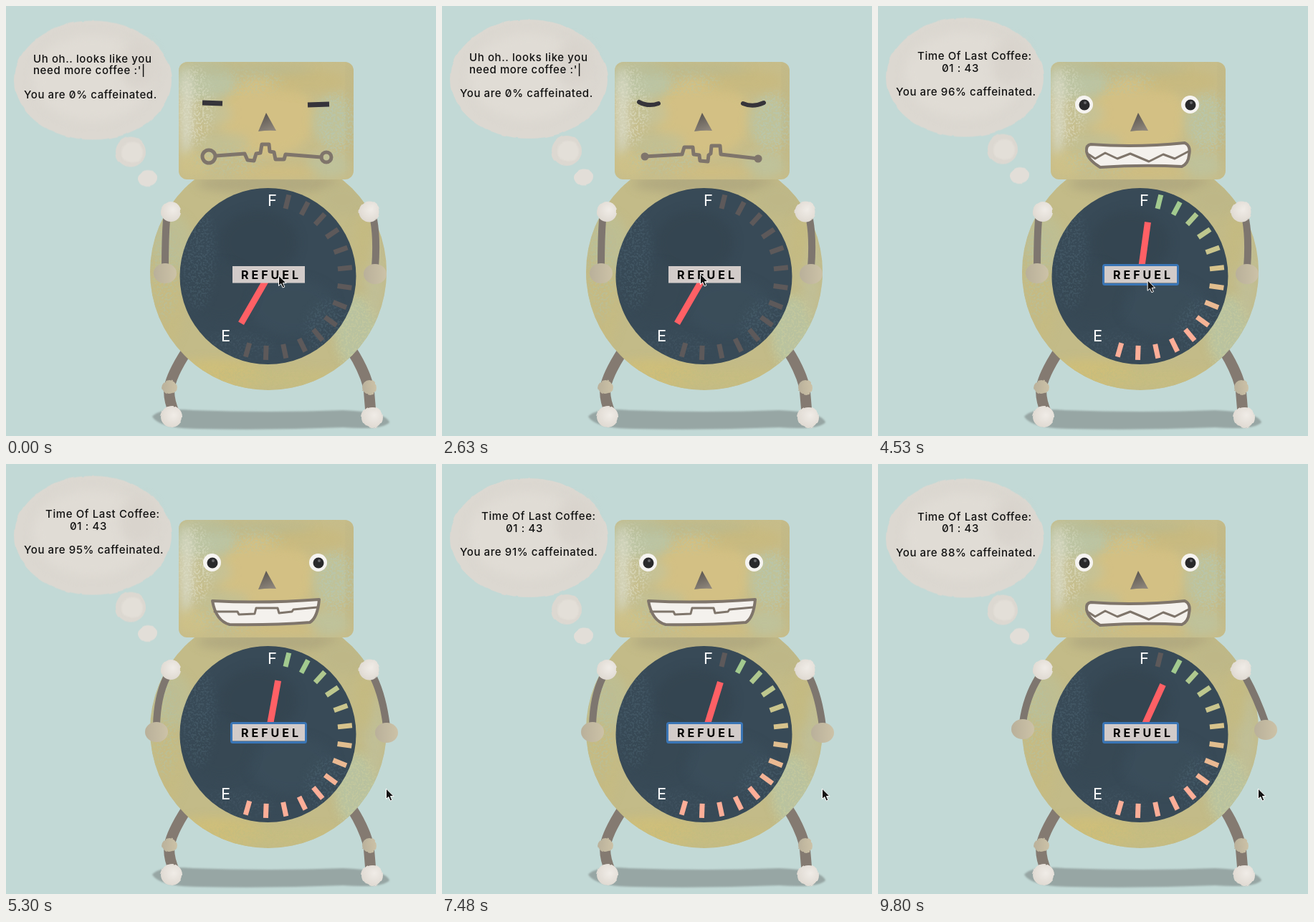
Write an HTML page that moves like this. It is 600 px wide and 600 px high and loops after 9.9 s.

```html
<!DOCTYPE html>
<html lang="en">
<head>
<meta charset="utf-8">
<title>Coffee robot</title>
<style>
  html, body { margin: 0; width: 100%; height: 100%; overflow: hidden; background: #c2d9d6; }
  svg { display: block; width: 100vw; height: 100vh; }
  filter { color-interpolation-filters: sRGB; }
  text { font: 500 15px Inter, Roboto, sans-serif; font-feature-settings: "zero"; white-space: pre; }
  #bubble text { letter-spacing: .6px; fill: #111; }
  .letter { font-size: 22px; font-weight: 400; fill: #fff; }
  .line { fill: none; stroke: #7f756b; stroke-width: 5; stroke-linejoin: round; stroke-linecap: round; }
  .lid { stroke: #36343a; stroke-width: 6; }
  .teeth { fill: #f4f1ed; stroke-width: 4; }
  .limb { fill: none; stroke: #7e766f; stroke-width: 10; stroke-linecap: round; }
</style>
</head>
<body>
<svg viewBox="0 0 600 600">
  <defs>
    <filter id="soft" x="-50%" y="-50%" width="200%" height="200%"><feGaussianBlur stdDeviation="7"/></filter>
    <filter id="edge" x="-10%" y="-30%" width="120%" height="160%"><feGaussianBlur stdDeviation="1.3"/></filter>
    <filter id="rough" x="-10%" y="-10%" width="120%" height="120%">
      <feTurbulence type="fractalNoise" baseFrequency=".05" numOctaves="2" seed="4"/>
      <feDisplacementMap in="SourceGraphic" scale="4" xChannelSelector="R" yChannelSelector="G"/>
    </filter>
    <filter id="grain" x="-20%" y="-20%" width="140%" height="140%">
      <feTurbulence type="fractalNoise" baseFrequency=".35" numOctaves="2" seed="8"/>
      <feColorMatrix values="0 0 0 0 1  0 0 0 0 1  0 0 0 0 1  9 0 0 0 -4.4" result="dots"/>
      <feGaussianBlur in="SourceGraphic" stdDeviation="6"/>
      <feComposite in2="dots" operator="in"/>
    </filter>
    <clipPath id="headShape"><rect x="241" y="78" width="244" height="164" rx="12"/></clipPath>
    <clipPath id="bodyShape"><circle cx="366" cy="371" r="165"/></clipPath>
    <clipPath id="dialShape"><circle cx="365.5" cy="377" r="123"/></clipPath>
    <radialGradient id="ball" cx=".6" cy=".4" r=".7">
      <stop offset="0" stop-color="#f0ece7"/><stop offset="1" stop-color="#ddd7cf"/>
    </radialGradient>
    <linearGradient id="hand">
      <stop offset="0" stop-color="#b9b09a"/><stop offset="1" stop-color="#ccc2a7"/>
    </linearGradient>
    <linearGradient id="nose" x1=".3" y1="0" x2=".7" y2="1">
      <stop offset="0" stop-color="#59544f"/><stop offset="1" stop-color="#8f877c"/>
    </linearGradient>
  </defs>

  <rect width="600" height="600" fill="#c2d9d6"/>
  <path d="M204 573Q215 560 260 564Q370 568 470 564Q530 566 535 581Q525 592 470 588Q370 592 270 590Q215 590 204 573Z" fill="#97a6a4" filter="url(#edge)"/>

  <g fill="none" stroke="#847a71" stroke-width="15">
    <path d="M253 480Q232 512 228 532Q226 548 235 568"/>
    <path d="M482 480Q499 506 506 532L509 568"/>
  </g>
  <g filter="url(#rough)">
    <circle cx="228" cy="532" r="10" fill="url(#hand)"/><circle cx="507" cy="532" r="10" fill="url(#hand)"/>
    <circle cx="231" cy="573" r="15" fill="url(#ball)"/><circle cx="511" cy="574" r="15" fill="url(#ball)"/>
  </g>

  <g id="body" clip-path="url(#bodyShape)"><rect x="200" y="200" width="334" height="340" fill="#c3bb88"/></g>
  <g id="head" clip-path="url(#headShape)"><rect x="241" y="78" width="244" height="164" fill="#c7bd8a"/></g>
  <g id="dial" clip-path="url(#dialShape)"><rect x="240" y="250" width="250" height="252" fill="#384a57"/></g>

  <text class="letter" x="365" y="279">F</text>
  <text class="letter" x="300" y="468">E</text>
  <g id="ticks"></g>
  <rect id="needle" x="361.5" y="301" width="9" height="76" fill="#ff6065"/>
  <rect id="button" x="316" y="363" width="101" height="23.5" fill="#d2cbc9"/>
  <rect id="focus" x="314.5" y="361.5" width="104" height="27" rx="2" fill="none" stroke="#3a75b5" stroke-width="3"/>
  <text x="328" y="381" style="font-size:16px;font-weight:700;letter-spacing:4px">REFUEL</text>

  <path d="M363 149L352 175Q365 173 377 174Z" fill="url(#nose)"/>
  <g id="sleepFlat" class="line">
    <path class="lid" style="stroke-width:7;stroke-linecap:butt" d="M274 135L302 136M421 138L451 137"/>
    <circle cx="283" cy="210" r="9"/><circle cx="447" cy="211" r="7"/>
    <path d="M293 209L333 206L337 215L346 216L349 206L355 205L357 193L367 193L368 203L374 204L376 214L388 214L390 207L440 211"/>
  </g>
  <g id="sleepCurved" class="line">
    <path class="lid" d="M275 134Q288 141 302 136M420 136Q434 142 449 135"/>
    <path d="M283 210L335 207L338 197L350 197L351 207L359 208L360 216L371 217L372 208L375 206L376 195L388 195L389 207L441 213"/>
    <path style="stroke-width:11" d="M283 210h.1M441 213h.1"/>
  </g>
  <g id="openEyes">
    <g fill="#f6f4f1"><circle cx="287.5" cy="137.5" r="12.5"/><circle cx="435.5" cy="137.5" r="12.5"/></g>
    <g fill="#29292b"><circle cx="288" cy="138" r="7.5"/><circle cx="436" cy="138" r="7.5"/></g>
    <g fill="#66666a"><circle cx="289" cy="135" r="2"/><circle cx="437" cy="135" r="2"/></g>
  </g>
  <g id="zigzag" class="line">
    <path class="teeth" d="M297 193Q360 198 428 191Q437 195 434 208Q433 220 424 224Q370 221 310 225Q293 215 291 203Q290 194 297 193Z"/>
    <path style="stroke-width:3" d="M294 207L303 213L317 205L334 213L352 206L378 217L398 207L414 213L433 203"/>
  </g>
  <g id="grin" class="line">
    <path class="teeth" d="M288 191Q360 195 437 189Q435 214 424 221Q370 225 312 224Q293 219 288 191Z"/>
    <path style="stroke-width:3" d="M291 206L323 206L325 210L347 209L349 201L379 201L381 208L399 206L401 203L434 200"/>
  </g>

  <g id="arms">
    <path class="limb"/><path class="limb"/>
    <ellipse rx="16" ry="14" fill="url(#hand)"/><ellipse rx="16" ry="14" fill="url(#hand)"/>
  </g>
  <g fill="url(#ball)" filter="url(#rough)">
    <circle cx="230" cy="287" r="14"/><circle cx="507" cy="287" r="14.5"/>
  </g>

  <g id="bubble">
    <g fill="#dcd8d1" filter="url(#rough)">
      <ellipse cx="121" cy="101" rx="110" ry="83"/>
      <ellipse cx="120" cy="98" rx="82" ry="60" fill="#e0dcd5" filter="url(#soft)"/>
      <ellipse cx="185" cy="80" rx="26" ry="34" fill="#d9d4cd" filter="url(#soft)"/>
      <circle cx="174" cy="201" r="21"/><ellipse cx="198" cy="238" rx="13" ry="11.5" fill="#e2ded8"/>
      <ellipse cx="176" cy="202" rx="15" ry="14" fill="#e3dfd8" filter="url(#edge)"/>
    </g>
    <text id="line1" y="76.5"></text><text id="line2" y="93"></text><text id="line3" x="25" y="126.5"></text>
  </g>

  <path id="cursor" d="M0 0V14.5L3.3 11.5L5.7 17L8.3 15.9L6 10.6H10.5Z" fill="#111" stroke="#fff"/>
</svg>
<script>
const LOOP = 9900, WAKE = 2830, FULL = 4350, PEAK = 96.5, DECAY = 1.5;
const $ = id => document.getElementById(id);
const clamp01 = x => Math.min(1, Math.max(0, x));
const ease = x => { x = clamp01(x); return x * x * (3 - 2 * x); };

function add(parent, tag, attrs) {
  const el = document.createElementNS('http://www.w3.org/2000/svg', tag);
  for (const key in attrs) el.setAttribute(key, attrs[key]);
  parent.appendChild(el);
  return el;
}

// Patches of paint: [cx, cy, rx, ry, colour, opacity]
function paint(id, filter, patches) {
  for (const [cx, cy, rx, ry, fill, opacity] of patches)
    add($(id), 'ellipse', { cx, cy, rx, ry, fill, opacity, filter: `url(#${filter})` });
}

paint('head', 'soft', [
  [363, 155, 68, 55, '#d5c183', .85], [275, 105, 45, 28, '#bac6a8', .8],
  [252, 150, 10, 65, '#d6d8c4', .9], [262, 220, 24, 18, '#cfc288', .8],
  [300, 190, 40, 14, '#c2c094', .8], [455, 160, 28, 36, '#bdc5a0', .7],
  [420, 105, 55, 16, '#c8b97e', .8], [340, 88, 90, 8, '#b9b98f', .7],
  [450, 222, 30, 18, '#bcc4a1', .7], [376, 232, 60, 8, '#d2bd7e', .8],
  [481, 150, 4, 80, '#b8b284', .7], [290, 150, 25, 18, '#c3c39b', .7]
]);
paint('head', 'grain', [
  [265, 140, 24, 55, '#dfdfc8', .5], [462, 165, 26, 45, '#b4c9b8', .5],
  [310, 215, 50, 20, '#b9c5a4', .5], [330, 105, 60, 18, '#b9c5a4', .5]
]);
paint('body', 'soft', [
  [366, 248, 100, 14, '#b0a87f', .9], [232, 330, 28, 40, '#bdbf95', .8],
  [222, 420, 24, 60, '#c6bb82', .8], [290, 515, 70, 22, '#d0bf79', .9],
  [400, 520, 90, 14, '#c8bd80', .8], [490, 455, 30, 50, '#b8c4a2', .9],
  [515, 380, 14, 60, '#c0c09a', .8], [470, 270, 34, 24, '#bdb788', .8],
  [500, 330, 14, 40, '#c5ba80', .7]
]);
paint('body', 'grain', [
  [222, 370, 20, 70, '#b4c2a2', .5], [490, 460, 32, 60, '#cfcf9d', .4], [330, 520, 100, 16, '#c0bd82', .5]
]);
paint('dial', 'soft', [
  [352, 330, 55, 45, '#34444f', .7], [400, 420, 60, 40, '#3b4e5b', .8], [300, 400, 45, 40, '#374853', .6]
]);
paint('dial', 'grain', [
  [268, 350, 24, 74, '#56707f', .3], [450, 450, 34, 40, '#56707f', .3], [320, 475, 55, 20, '#4f6673', .25]
]);

const mix = (a, b, k) => `rgb(${a.map((v, i) => Math.round(v + (b[i] - v) * k))})`;
const SALMON = [253, 174, 152], TAN = [215, 195, 140], GREEN = [162, 202, 143];
const ticks = Array.from({ length: 14 }, (_, i) => {
  const n = i + 1;
  const el = add($('ticks'), 'rect', {
    x: 363, y: 260, width: 7, height: 20, transform: `rotate(${210 - 14 * n} 366.5 377)`
  });
  const colour = n < 9 ? mix(SALMON, TAN, clamp01((n - 5) / 4)) : mix(TAN, GREEN, clamp01((n - 9) / 4));
  return { el, colour };
});

// Arm poses: hand x, hand y and elbow x
const POSES = [
  { left: [222, 373, 222], right: [515, 374, 518] },
  { left: [210, 374, 211], right: [531, 375, 526] },
  { left: [202, 370, 207], right: [541, 371, 528] },
  { left: [193, 367, 203], right: [549, 368, 533] }
];
const SWING = [0, 1, 2, 3, 2, 1];

function poseAt(t) {
  if (t < 2950) return 0;
  if (t < 3400) return 1;
  if (t < 4230) return 2;
  const step = 5 + Math.floor((t - 5300) / 154);
  return SWING[(step % 6 + 6) % 6];
}

function drawArms(pose) {
  const [leftArm, rightArm, leftHand, rightHand] = $('arms').children;
  const place = (arm, hand, x0, [x, y, elbow]) => {
    arm.setAttribute('d', `M${x0} 298Q${elbow} 325 ${x} ${y - 9}`);
    hand.setAttribute('cx', x);
    hand.setAttribute('cy', y);
  };
  place(leftArm, leftHand, 224, POSES[pose].left);
  place(rightArm, rightHand, 513, POSES[pose].right);
}

function levelAt(t) {
  if (t < WAKE) return 0;
  if (t < FULL) return PEAK * (t - WAKE) / (FULL - WAKE);
  return PEAK - DECAY * (t - FULL) / 1000;
}

function cursorAt(t) {
  const toButton = ease((t - 200) / 1100), away = clamp01((t - 4400) / 700);
  return [
    380.5 - 20 * toButton + 170 * ease(away),
    376 - 2 * toButton + 79 * ease(away) + 14 * Math.sin(Math.PI * away) * away
  ];
}

const show = (id, on) => $(id).style.display = on ? '' : 'none';
function say(id, x, words) {
  $(id).setAttribute('x', x);
  if ($(id).textContent !== words) $(id).textContent = words;
}

function draw(t) {
  const awake = t >= WAKE, level = levelAt(t), percent = Math.floor(level);
  const second = Math.floor(t / (awake ? 500 : 700)) % 2 === 1;

  show('sleepFlat', !awake && !second);
  show('sleepCurved', !awake && second);
  show('openEyes', awake);
  show('grin', awake && !second);
  show('zigzag', awake && second);
  show('focus', awake);

  say('line1', awake ? 55 : 38, awake ? 'Time Of Last Coffee:' : 'Uh oh.. looks like you');
  say('line2', awake ? 89 : 38, awake ? '01 : 43' : "need more coffee :'|");
  say('line3', 25, `You are ${percent}% caffeinated.`);
  const bob = 0.5 - 2 * Math.cos(2 * Math.PI * (t - 3680) / 820);
  $('bubble').setAttribute('transform', `translate(0 ${bob.toFixed(2)})`);

  const lit = Math.floor(percent * 15 / 100);
  ticks.forEach(({ el, colour }, i) => el.setAttribute('fill', i < lit ? colour : '#5d595a'));
  $('needle').setAttribute('transform', `rotate(${210 - 2.1 * level} 366 377)`);
  drawArms(poseAt(t));
  $('cursor').setAttribute('transform', `translate(${cursorAt(t)})`);
}

const start = performance.now();
function frame() {
  draw((performance.now() - start) % LOOP);
  requestAnimationFrame(frame);
}
frame();
</script>
</body>
</html>
```
